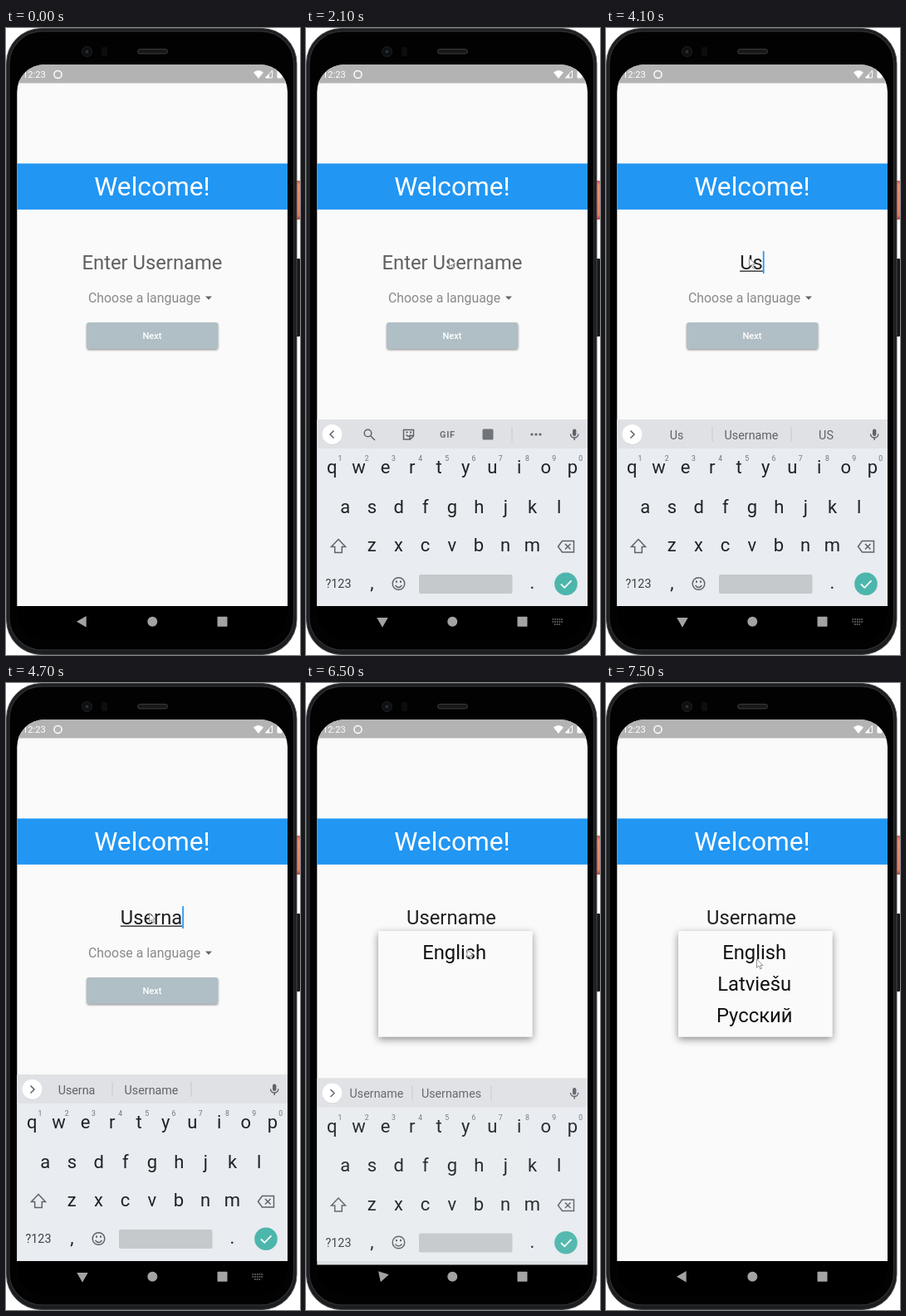
These frames come from a looping animation (354 px wide and 756 px high, 8000 ms). An HTML page:

```html
<!DOCTYPE html>
<html lang="en">
<head>
<meta charset="utf-8">
<title>Welcome form</title>
<style>
  html, body { margin: 0; width: 100%; height: 100%; overflow: hidden; background: #fff; }
  svg { display: block; width: 354px; height: 756px; font-family: Roboto, "Noto Sans", sans-serif; }
  .mid { text-anchor: middle; }
  .line { fill: none; stroke: #5f6368; stroke-width: 1.5; }
  .big { font-size: 23.8px; }
</style>
</head>
<body>
<svg viewBox="0 0 354 756">
  <defs>
    <clipPath id="screenClip"><rect x="13.300" y="44" width="325.700" height="694" rx="33"/></clipPath>
    <linearGradient id="power" x2="0" y2="1">
      <stop offset="0" stop-color="#c9604c"/><stop offset=".12" stop-color="#f28a74"/>
      <stop offset=".88" stop-color="#ea7b66"/><stop offset="1" stop-color="#a94a3a"/>
    </linearGradient>
    <filter id="soft" x="-20%" y="-20%" width="140%" height="150%">
      <feDropShadow dx="0" dy="3" stdDeviation="5" flood-opacity=".45"/>
    </filter>
    <filter id="low" x="-10%" y="-20%" width="120%" height="160%">
      <feDropShadow dx="0" dy="1.3" stdDeviation="1" flood-opacity=".4"/>
    </filter>
  </defs>

  <!-- phone body -->
  <rect x="348" y="184" width="6" height="47" rx="1" fill="url(#power)"/>
  <rect x="348" y="278" width="6" height="94" rx="1" fill="#17181a"/>
  <rect x=".5" y=".5" width="349.500" height="755" rx="42" fill="#1c1d1f" stroke="#44474a"/>
  <rect x="4" y="4" width="342.500" height="746" rx="39" fill="#020202" stroke="#2b2d2f" stroke-width="1.300"/>
  <rect x="158.500" y="25.500" width="36" height="5.500" rx="2.700" fill="#191919" stroke="#3b3b3b"/>
  <circle cx="97.500" cy="28.500" r="6" fill="#0d0f11" stroke="#1f2224"/>
  <circle cx="97.500" cy="28.500" r="2" fill="#2b3036"/>
  <rect x="115" y="23" width="7" height="11" rx="2" fill="#0d0d0e"/>

  <g clip-path="url(#screenClip)">
    <rect x="13" y="44" width="326" height="653" fill="#fafafa"/>
    <rect x="13" y="44" width="326" height="22.500" fill="#b4b3b3"/>
    <g fill="#fff">
      <text x="20" y="60" font-size="11.2">12:23</text>
      <circle cx="62.500" cy="56" r="4.600" fill="none" stroke="#fff" stroke-width="1.5"/>
      <path d="M298 53.500Q304 48.500 310 53.500L304 61Z"/>
      <path d="M312.500 60H320.500V51.500Z" fill="none" stroke="#fff"/>
      <path d="M312.500 60H317V55Z"/>
      <rect x="326.500" y="52" width="6" height="8.500" rx=".8"/>
      <rect x="328.200" y="51" width="2.600" height="2"/>
    </g>
    <rect x="13" y="163.400" width="326" height="55.500" fill="#2196f3"/>
    <text class="mid" x="176" y="202" font-size="31.7" fill="#fff">Welcome!</text>

    <text id="field" class="mid big" y="291"></text>
    <rect id="under" y="292.500" height="1.300" fill="#212121"/>
    <rect id="caret" y="269" width="1.700" height="27" fill="#2196f3"/>

    <text x="99" y="331" font-size="15.86" fill="#8a8a8a">Choose a language</text>
    <path d="M240 323.500H248L244 327.700Z" fill="#666"/>
    <rect x="97" y="355" width="158.500" height="32" rx="3" fill="#b0bec5" filter="url(#low)"/>
    <text class="mid" x="176" y="375" font-size="11.1" font-weight="500" fill="#fff">Next</text>

    <g id="menu">
      <rect x="87" y="299" width="185.500" height="127.500" rx="1.600" fill="#fafafa" filter="url(#soft)"/>
      <g class="mid big" fill="#111">
        <text x="178.700" y="333">English</text>
        <text id="item2" x="178.700" y="371">Latviešu</text>
        <text id="item3" x="178.700" y="409">Русский</text>
      </g>
    </g>

    <rect x="13" y="697" width="326" height="42" fill="#000"/>
    <g id="keyboard">
      <rect x="13" y="472" width="326" height="225" fill="#e9ecf0"/>
      <rect x="13" y="472" width="326" height="35" fill="#dfe1e5"/>
      <circle cx="31.500" cy="490.600" r="12" fill="#c8cacd"/>
      <circle cx="31.500" cy="490" r="12" fill="#fff"/>
      <path id="chevron" class="line"/>
      <g id="tools">
        <circle class="line" cx="74.500" cy="488.500" r="4.300"/>
        <path class="line" d="M77.700 491.700L83 497" stroke-width="2"/>
        <path class="line" d="M117.500 484.500H129.500V492L125.500 496H117.500ZM129.500 491.500H125V496M120.500 490.500Q123.500 494 126.500 490.500"/>
        <path d="M120.500 486.500h2v2h-2ZM125 486.500h2v2h-2Z" fill="#5f6368"/>
        <text x="161" y="493.800" font-size="11" font-weight="700" letter-spacing=".7" fill="#6c7075">GIF</text>
        <rect x="212.500" y="483.500" width="13" height="13" rx="1.500" fill="#70757a"/>
        <path d="M248 481V499" stroke="#c5c8cc"/>
        <g fill="#5f6368"><circle cx="272" cy="490" r="1.600"/><circle cx="277" cy="490" r="1.600"/><circle cx="282" cy="490" r="1.600"/></g>
      </g>
      <g id="hints" class="mid" font-size="14.3" fill="#5f6368">
        <path d="M128 481V499M223 481V499" stroke="#c5c8cc"/>
        <text x="85" y="495.500"></text><text x="175" y="495.500"></text><text x="265" y="495.500"></text>
      </g>
      <rect x="321" y="483.500" width="4.400" height="8.500" rx="2.200" fill="#5f6368"/>
      <path class="line" d="M318.600 489.500a4.600 4.600 0 0 0 9.200 0M323.200 494V497" stroke-width="1.300"/>
      <g id="keys" class="mid" font-size="22" fill="#1f2226"></g>
      <path class="line" d="M39 616.500L47.500 625.500H43.300V632.500H34.700V625.500H30.500Z"/>
      <path class="line" d="M308.500 618.500H322.500V632H308.500L303.500 625.200ZM312 622L318.500 628.500M318.500 622L312 628.500"/>
      <text class="mid" x="39" y="675" font-size="14.3" fill="#3c4043">?123</text>
      <circle class="line" cx="111.500" cy="670" r="7.300"/>
      <path class="line" d="M107.500 672Q111.500 677 115.500 672"/>
      <path d="M108 666.500h2v2.200h-2ZM113 666.500h2v2.200h-2Z" fill="#5f6368"/>
      <rect x="136" y="659" width="112.500" height="23" rx="2" fill="#c6c9cc"/>
      <circle cx="313" cy="670.300" r="13.800" fill="#4db6ac"/>
      <path d="M307 670.500L311.300 674.800L319.500 666.300" fill="none" stroke="#fff" stroke-width="1.800"/>
    </g>
    <rect id="scrim" x="13" y="697" width="326" height="42" fill="#000" opacity=".24"/>
    <g fill="#a3a3a3">
      <path id="back" d="M-7 0L4.700 -6.700V6.700Z"/>
      <circle cx="176.300" cy="715.800" r="6"/>
      <rect x="254.500" y="709.700" width="12" height="12" rx=".7"/>
      <path id="imeIcon" d="M296.500 713H309.500M296.500 716H309.500M299 719H307" stroke="#777" stroke-width="1.600" stroke-dasharray="1.700 1"/>
    </g>
  </g>
  <path id="pointer" d="M0 0V10.200L2.500 8L4.300 12L6 11.200L4.200 7.400H7.400Z" fill="#fff" stroke="#777" stroke-width=".8"/>
</svg>

<script>
const LOOP = 8000;
const $ = id => document.getElementById(id);

// Tables of [time, ...values]; the latest row holds.
const typed = [[0, ""], [3400, "U"], [4100, "Us"], [4300, "Use"], [4400, "User"],
  [4500, "Usern"], [4600, "Userna"], [4800, "Usernam"], [4900, "Username"]];
const hints = [[0], [3500, "U", "Us", "US"], [4100, "Us", "Username", "US"],
  [4300, "Use", "Used", "User"], [4400, "User", "Username", "Users"],
  [4600, "Userna", "Username", ""], [4900, "Username", "Usernames", ""]];
// offset, opacity, back arrow angle
const slide = [[0, 300, 0, 0], [1600, 27, .82, -34], [1700, 8, .95, -75], [1800, 0, 1, -90],
  [6500, 4.5, .95, -72], [6600, 60, .45, -20], [6700, 300, 0, 0]];
const mouse = [[0, -50, -50], [1600, 172.5, 277.5], [5800, 184, 301], [5900, 194, 321],
  [7200, 192, 323], [7300, 188, 327], [7400, 184, 331], [7500, 181.5, 333]];
const carets = [[1600, 2100], [2600, 3100], [3400, 3900], [4100, 5400], [5900, 6500]];

const at = (rows, t) => rows.filter(r => r[0] <= t).pop().slice(1);
const set = (el, name, value) => el.setAttribute(name, value);
const show = (el, on) => set(el, "visibility", on ? "visible" : "hidden");

function addKeys() {
  const label = (x, y, s, extra = "") => `<text x="${x}" y="${y}" ${extra}>${s}</text>`;
  const row = (letters, x, y) => [...letters].map((c, i) => label(x + i * 32.2, y, c)).join("");
  const digits = [..."1234567890"].map((c, i) =>
    label(41 + i * 32.2, 522, c, 'font-size="8.700" fill="#70757a"')).join("");
  $("keys").innerHTML = row("qwertyuiop", 31.2, 537) + digits + row("asdfghjkl", 47.2, 584.5) +
    row("zxcvbnm", 79.2, 631) + label(79.5, 676, ",") + label(272.5, 676, ".");
}

function draw(t) {
  const [text] = at(typed, t);
  const field = $("field");
  const middle = text ? 175 : 176; // typed text leaves room for the caret
  field.textContent = text || "Enter Username";
  set(field, "x", middle);
  set(field, "fill", text ? "#212121" : "#606060");
  const width = text ? field.getComputedTextLength() : 0;
  set($("under"), "x", middle - width / 2);
  set($("under"), "width", width);
  show($("under"), t < 6500);
  set($("caret"), "x", 175 + width / 2);
  show($("caret"), carets.some(([a, b]) => t >= a && t < b));

  const words = at(hints, t);
  const suggest = words.length > 0;
  show($("tools"), !suggest);
  show($("hints"), suggest);
  $("hints").querySelectorAll("text").forEach((el, i) => el.textContent = words[i] || "");
  set($("chevron"), "d", suggest ? "M29.500 485.500L34 490L29.500 494.500" : "M33.500 485.500L29 490L33.500 494.500");

  const [dy, alpha, angle] = at(slide, t);
  set($("keyboard"), "transform", `translate(0 ${dy})`);
  set($("keyboard"), "opacity", alpha);
  show($("scrim"), dy > 4.5 && alpha > 0);
  set($("back"), "transform", `translate(92 715.700) rotate(${angle})`);
  show($("imeIcon"), t >= 1600 && t < 6500);

  show($("menu"), t >= 6500);
  set($("item2"), "opacity", t < 6600 ? 0 : 1);
  set($("item3"), "opacity", t < 6600 ? 0 : t < 6700 ? .5 : 1);

  const [x, y] = at(mouse, t);
  set($("pointer"), "transform", `translate(${x} ${y})`);
}

addKeys();
const start = performance.now();
function tick() {
  draw((performance.now() - start) % LOOP);
  requestAnimationFrame(tick);
}
tick();
</script>
</body>
</html>
```
